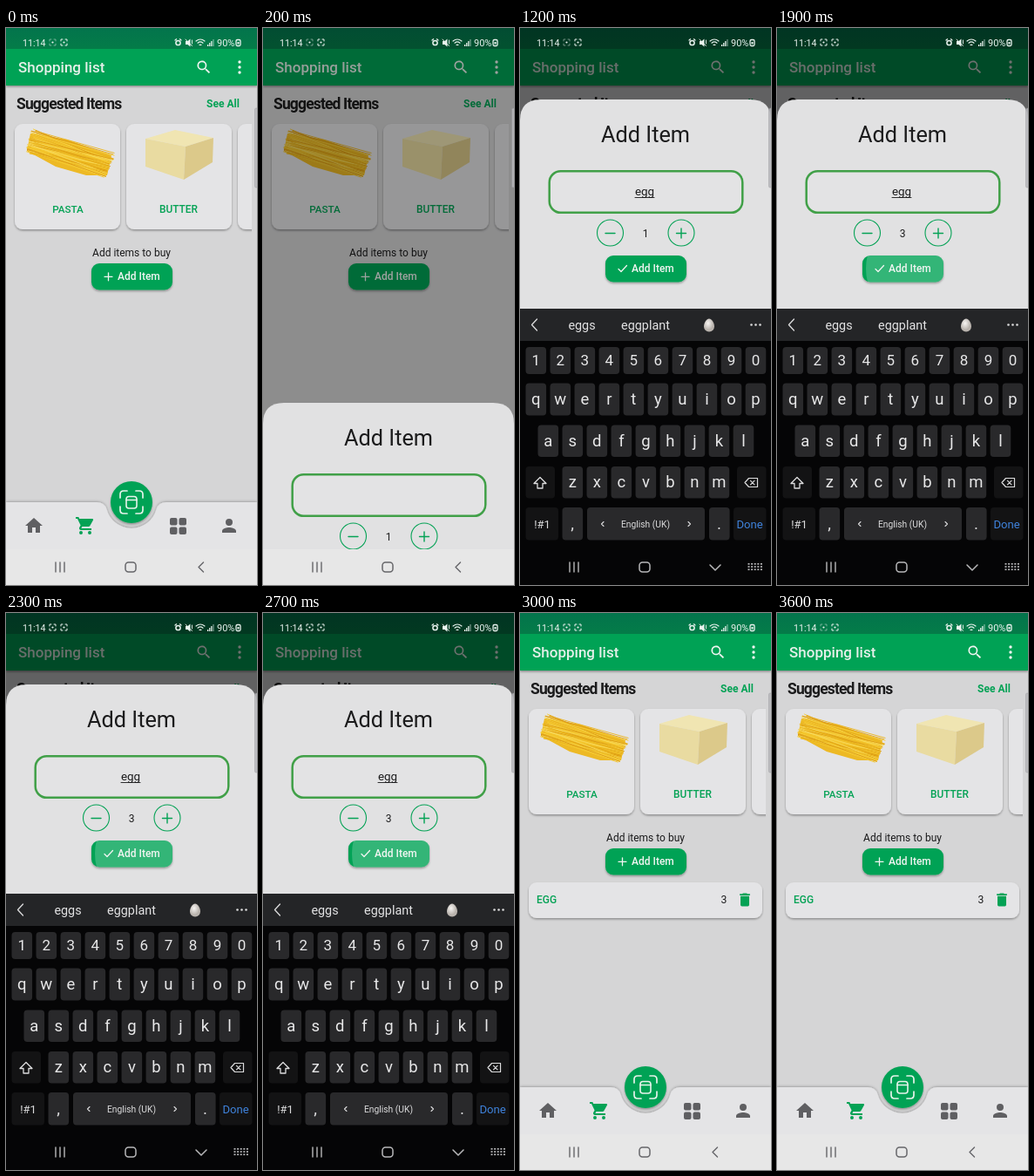
These frames come from a looping animation (288x639 px, 3.7 s). An HTML page:

```html
<!DOCTYPE html>
<html lang="en">
<head>
<meta charset="utf-8">
<title>Shopping list</title>
<style>
html, body { margin: 0; width: 100%; height: 100%; overflow: hidden; background: #d5d5d6; }
svg { display: block; width: 100vw; height: 100vh; }
text { font-family: Roboto, "Liberation Sans", sans-serif; }
.line { fill: none; stroke-linecap: round; stroke-linejoin: round; }
</style>
</head>
<body>
<svg id="stage" viewBox="0 0 288 639" xmlns="http://www.w3.org/2000/svg"></svg>
<script>
const GREEN = '#04a255', INK = '#1b1b1c', GREY = '#5f5f62', LIGHT = '#e4e4e6';
const LOOP = 3700, STEP = 100;

const rect = (x, y, w, h, fill, r = 0, extra = '') =>
  `<rect x="${x}" y="${y}" width="${w}" height="${h}" rx="${r}" fill="${fill}" ${extra}/>`;
const circle = (x, y, r, fill, extra = '') =>
  `<circle cx="${x}" cy="${y}" r="${r}" fill="${fill}" ${extra}/>`;
const shape = (d, fill, extra = '') => `<path d="${d}" fill="${fill}" ${extra}/>`;
const line = (d, color, w = 1.3) => `<path class="line" d="${d}" stroke="${color}" stroke-width="${w}"/>`;
const text = (str, x, y, size, fill, weight = 400, anchor = 'middle', extra = '') =>
  `<text x="${x}" y="${y}" font-size="${size}" fill="${fill}" font-weight="${weight}" text-anchor="${anchor}" ${extra}>${str}</text>`;
const group = (id, body, extra = '') => `<g id="${id}" ${extra}>${body}</g>`;
// 24-unit icon centred on x, y
const icon = (d, x, y, size, fill) =>
  shape(d, fill, `transform="translate(${x - size / 2} ${y - size / 2}) scale(${size / 24})"`);

const ICONS = {
  home: 'M10 20v-6h4v6h5v-8h3L12 3 2 12h3v8z',
  cart: 'M7 18a2 2 0 1 0 0 4 2 2 0 0 0 0-4zM1 2v2h2l3.6 7.6-1.4 2.4c-.7 1.4.3 3 1.8 3h12v-2H7.4l1-2h7.2c.8 0 1.4-.4 1.8-1l3.6-6.5A1 1 0 0 0 20 4H5.2l-.9-2zM17 18a2 2 0 1 0 0 4 2 2 0 0 0 0-4z',
  person: 'M12 12a4 4 0 1 0 0-8 4 4 0 0 0 0 8zm0 2c-2.7 0-8 1.3-8 4v2h16v-2c0-2.7-5.3-4-8-4z',
  search: 'M15.5 14h-.8l-.3-.3A6.5 6.5 0 1 0 13.7 14.4l.3.3v.8l5 5 1.5-1.5zM9.5 14a4.5 4.5 0 1 1 0-9 4.5 4.5 0 0 1 0 9z',
  bin: 'M6 19a2 2 0 0 0 2 2h8a2 2 0 0 0 2-2V7H6zM19 4h-3.5l-1-1h-5l-1 1H5v2h14z',
};

let seed = 7;
const random = () => (seed = (seed * 16807) % 2147483647) / 2147483647;

function pasta() {
  const tones = ['#f6cf3a', '#eab41c', '#f3c52a', '#dc9a12', '#f8da5c'];
  let out = shape('M28 121 70 128 121 146 116 169 92 169 57 159 24 141Z', '#edb925');
  for (let i = 0; i < 64; i++) {
    const a = random(), b = random() * 0.45 + a * 0.55;
    const x1 = 29 - 7 * a + 8 * random(), y1 = 116 + 28 * a;
    const x2 = 124 - 14 * b + 3 * random(), y2 = 142 + 32 * b;
    out += line(`M${x1} ${y1}L${x2} ${y2}`, tones[i % 5], 0.9);
  }
  return out;
}

const butter = () =>
  shape('M160 127 194 117 238 126 206 136Z', '#f0e5b2') +
  shape('M160 127 206 136 204 174 160 159Z', '#e9dba1') +
  shape('M206 136 238 126 237 154 204 174Z', '#dcc98a');

const card = (x, y, w, h) => rect(x, y, w, h, LIGHT, 9, 'filter="url(#shadow)"');

const addButton = (y, mark, id) =>
  rect(98, y, 93, 30.5, GREEN, 9, 'filter="url(#shadow)"') +
  group(id, '') + mark +
  text('Add Item', 128, y + 19.2, 12, '#f1f5f2', 500, 'start');

function home() {
  const dots = [39, 45, 51].map(y => circle(268, y, 1.7, '#f0f5f2')).join('');
  const tiles = [188, 198.5].map(x => [562, 572.5].map(y => rect(x, y, 8.5, 8.5, GREY, 2)).join('')).join('');
  const corners = 'M131 539v-4q0-4 4-4h4M149 531h4q4 0 4 4v4M157 549v4q0 4-4 4h-4M139 557h-4q-4 0-4-4v-4';
  return rect(0, 0, 288, 639, '#d5d5d6') +
    rect(0, 23, 288, 43, GREEN, 0, 'filter="url(#shadow)"') +
    rect(0, 0, 288, 24, 'url(#status)') +
    text('Shopping list', 14, 51, 17, '#e6f0ea', 500, 'start') +
    icon(ICONS.search, 227, 45, 20, '#f0f5f2') + dots +
    text('Suggested Items', 12, 93, 17.5, INK, 700, 'start', 'letter-spacing="-.85"') +
    text('See All', 249, 90.5, 12, GREEN, 700) +
    `<g clip-path="url(#strip)">${card(10, 110, 121, 121)}${card(138, 110, 121, 121)}${card(266, 110, 121, 121)}</g>` +
    pasta() + butter() +
    text('PASTA', 71, 212, 11.7, GREEN, 500) + text('BUTTER', 198, 212, 11.9, GREEN, 500) +
    text('Add items to buy', 144, 262, 12, INK) +
    addButton(270, line('M113 285.3h9M117.5 280.8v9', '#f1f5f2'), 'tap') +
    group('item', card(10, 309, 268, 41) + text('EGG', 19, 333, 12, GREEN, 500, 'start') +
      text('3', 234, 333, 12.2, INK) + icon(ICONS.bin, 258, 329, 20, GREEN)) +
    shape('M0 544H104Q113 544 115.5 552A29.5 29.5 0 0 0 172.5 552Q175 544 184 544H288V639H0Z', LIGHT, 'filter="url(#rim)"') +
    circle(144, 544, 24, GREEN, 'filter="url(#shadow)"') +
    line(corners, '#e8f3ec', 1.7) +
    `<rect x="138" y="537.5" width="12" height="13.5" rx="3" class="line" stroke="#e8f3ec" stroke-width="1.6"/>` +
    line('M138 541.5h12', '#e8f3ec', 1.6) +
    icon(ICONS.home, 32, 571, 24, GREY) + icon(ICONS.cart, 91, 571, 24, GREEN) +
    tiles + icon(ICONS.person, 256, 571, 24, GREY);
}

// Drawn with its top edge at y = 82
function sheet() {
  const ring = x => circle(x, 235, 15, 'none', `stroke="${GREEN}" stroke-width="1.1"`);
  return shape('M0 639V106Q0 82 24 82H264Q288 82 288 106V1200H0Z', '#e1e1e2') +
    text('Add Item', 144, 131, 25.3, INK) +
    rect(33.7, 164.2, 221.6, 47.6, '#e3e3e4', 13, 'stroke="#41a048" stroke-width="2.5"') +
    text('', 143, 191.5, 13.4, INK, 400, 'middle', 'id="entry"') +
    group('underline', line('M132 194.5h22', INK, 0.9)) +
    group('cursor', rect(142.3, 180, 1.4, 13.5, GREEN)) +
    ring(103.5) + ring(185) +
    circle(185, 235, 14.5, GREEN, 'id="plus" opacity=".18"') +
    line('M98 235.5h11M179.500 235.5h11M185 230v11', GREEN, 1.4) +
    text('1', 144, 239.500, 12, INK, 400, 'middle', 'id="count"') +
    addButton(261, line('M113 276.5l3 3 6.500-7', '#f1f5f2'), 'ripple');
}

function keyboard() {
  const key = (x, y, w, h, fill = '#29292b', id = '') => rect(x, y, w, h, fill, 4, id && `id="${id}"`);
  const row = (chars, x, y, h, size) => [...chars].map((c, i) =>
    key(x + 28.02 * i, y, 23.6, h, '#29292b', 'key-' + c) +
    text(c, x + 11.8 + 28.02 * i, y + h / 2 + size * 0.33, size, '#e8e8e9')).join('');
  const ink = '#dcdcdd', dark = '#131314';
  const tools = [32, 95, 158.5, 222].map(x => circle(x, 340, 13.5, '#454547')).join('') +
    `<circle cx="32" cy="340" r="6.2" class="line" stroke="${ink}" stroke-width="1.3"/>` +
    circle(29.7, 338.3, 0.9, ink) + circle(34.3, 338.3, 0.9, ink) + line('M29 341.500q3 4 6 0', ink, 1.1) +
    `<rect x="92.700" y="333" width="4.600" height="9" rx="2.300" class="line" stroke="${ink}" stroke-width="1.2"/>` +
    line('M90 339.500q0 5 5 5t5-5M95 344.500v2.500', ink, 1.2) +
    line('M158.500 333.500 164 336.800V343.200L158.500 346.500 153 343.200V336.800Z', ink, 1.3) +
    `<circle cx="158.500" cy="340" r="2" class="line" stroke="${ink}" stroke-width="1.2"/>` +
    icon(ICONS.search, 222, 340, 17, ink);
  const words = line('M19.500 334l-6 6.500 6 6.500', ink, 1.3) +
    [71, 144, 217].map((x, i) => text('', x, 346, 14.4, '#e3e3e4', 400, 'middle', `id="word${i}"`)).join('') +
    group('egg', shape('M217 333.500C220.500 333.500 223 339 223 342.500A6 6 0 0 1 211 342.500C211 339 213.500 333.500 217 333.500Z', 'url(#shell)'));
  return rect(0, 322, 288, 317, '#050506') + rect(0, 322, 288, 37, '#242527') +
    group('tools', tools) + group('words', words) +
    [265.500, 270.500, 275.500].map(x => circle(x, 340.500, 1.300, ink)).join('') +
    row('1234567890', 6.500, 366, 31, 17) + row('qwertyuiop', 6.500, 407.500, 37, 18.500) +
    row('asdfghjkl', 20.500, 455.500, 36.500, 18.500) + row('zxcvbnm', 48.500, 503, 36.500, 18.500) +
    key(6.500, 503, 33.500, 36.500, dark) + line('M23 515.500l-7 7h4v5.500h6v-5.500h4Z', ink) +
    key(249, 503, 33.500, 36.500, dark) +
    line('M258 521.500l4.500-5h10v10h-10ZM264.500 519.300l4.500 4.500M269 519.300l-4.500 4.500', ink, 1.2) +
    key(6.500, 550, 37.500, 37.500, dark) + text('!#1', 25.500, 573.500, 13, ink) +
    key(48.500, 550, 23.600, 37.500) + text(',', 60, 575, 19, ink) +
    key(77, 550, 135, 37.500) + text('English (UK)', 144, 573, 10.3, ink) +
    line('M96 566.500l-2.500 2.500 2.500 2.500M193 566.500l2.500 2.500-2.500 2.500', ink, 1.1) +
    key(217, 550, 23.600, 37.500) + text('.', 228.500, 575, 19, ink) +
    key(245, 550, 37.500, 37.500, dark) + text('Done', 263.500, 573.500, 13.1, '#3f83dc');
}

function navBar(bg, ink, open) {
  const boards = [0, 1, 2].map(r => [0, 1, 2, 3, 4].map(c => rect(261.500 + c * 3.600, 614 + r * 3.200, 2, 1.700, ink)).join('')).join('');
  return rect(0, 598, 288, 41, bg) +
    line('M57 613v11M62 613v11M67 613v11', ink, 1.4) +
    `<rect x="137" y="613" width="12" height="11" rx="3.500" class="line" stroke="${ink}" stroke-width="1.5"/>` +
    (open ? line('M218 616l6 6 6-6', ink, 1.5) + boards : line('M226.500 613l-5.500 5.500 5.500 5.500', ink, 1.4));
}

function statusBar() {
  const ink = '#eaf2ee';
  const frame = (x, id) => group(id, line(`M${x} 15v-2h2M${x + 5} 13h2v2M${x + 7} 18v2h-2M${x + 2} 20h-2v-2`, ink, 1)) +
    circle(x + 3.5, 16.5, 1.1, ink);
  return text('11:14', 19, 20.500, 10.700, ink, 400, 'start') + frame(50, 'blink') + frame(63, 'steady') +
    `<circle cx="197.500" cy="17" r="2.600" class="line" stroke="${ink}" stroke-width="1.500"/>` +
    line('M194 14l1.500-1.300M201 14l-1.500-1.300', ink, 1.2) +
    shape('M206 15h2.500l3-2.500v9l-3-2.500H206Z', ink) + line('M206 13l7.500 7.500M213.500 14v4', ink, 0.9) +
    line('M218 15q5-4 10 0M220 17.200q3-2.500 6 0M222 19.300h2', ink, 1.2) +
    [0, 1, 2, 3].map(i => rect(231 + i * 2.100, 19 - i * 2, 1.300, 2 + i * 2, ink, 0, i > 2 ? 'opacity=".5"' : '')).join('') +
    text('90%', 242, 20.500, 11, ink, 400, 'start') +
    `<rect x="264" y="13.500" width="5" height="7" rx="1.500" class="line" stroke="${ink}" stroke-width="1.300"/>` +
    rect(265.500, 16, 2, 2.500, ink);
}

const defs = `<defs>
  <filter id="shadow" x="-20%" y="-20%" width="140%" height="150%"><feDropShadow dx="0" dy="1.500" stdDeviation="1.300" flood-color="#000" flood-opacity=".34"/></filter>
  <filter id="rim" x="-5%" y="-10%" width="110%" height="120%"><feDropShadow dx="0" dy="-.5" stdDeviation="1.600" flood-color="#000" flood-opacity=".32"/></filter>
  <linearGradient id="status" x2="0" y2="1"><stop stop-color="#03744c"/><stop offset="1" stop-color="#047c48"/></linearGradient>
  <radialGradient id="shell" cx=".4" cy=".35"><stop stop-color="#f7f5f2"/><stop offset="1" stop-color="#b9b3ad"/></radialGradient>
  <clipPath id="strip"><rect y="100" width="282" height="140"/></clipPath>
  <clipPath id="pill"><rect x="98" y="261" width="93" height="30.500" rx="9"/></clipPath>
</defs>`;

const stage = document.getElementById('stage');
stage.innerHTML = defs + home() + rect(0, 0, 288, 639, '#000', 0, 'id="scrim"') +
  group('sheet', sheet()) + group('keys', keyboard()) +
  group('navLight', navBar('#e7e7e7', '#66666a', false)) +
  group('navDark', navBar('#050506', '#b8b8ba', true)) + statusBar() +
  rect(285.500, 92, 4, 91, '#b9b9bd', 1.500, 'stroke="#98989c" stroke-width=".6" opacity=".85"');

const $ = id => document.getElementById(id);
const show = (id, on) => { $(id).style.display = on ? '' : 'none'; };
$('tap').innerHTML = rect(98, 270, 93, 30.500, '#fff', 9, 'opacity=".2"');
$('ripple').innerHTML = `<g clip-path="url(#pill)">${circle(165, 276, 0, '#fff', 'id="wave" opacity=".2"')}</g>`;

// Each row changes some values from its time on
const steps = [
  [0, { top: 639, scrim: 0, lift: 0, entry: '', words: [], count: 1, key: '', wave: 0 }],
  [100, { tap: true }],
  [200, { tap: false, top: 430, scrim: 0.34 }],
  [300, { top: 192, scrim: 0.54, lift: 0.6, cursor: true }],
  [400, { top: 82, lift: 1 }],
  [700, { key: 'e' }],
  [800, { key: '', entry: 'e', words: ['even', 'every', 'each'], cursor: false }],
  [900, { key: 'g' }],
  [1000, { key: '', entry: 'eg', words: ['egg', 'eggs', 'ego'] }],
  [1100, { key: 'g', entry: 'egg', words: ['eggs', 'eggplant', ''] }],
  [1200, { key: '' }],
  [1400, { plus: true }],
  [1500, { count: 2 }],
  [1600, { plus: false }],
  [1700, { plus: true, count: 3 }],
  [1800, { plus: false, wave: 28 }],
  [1900, { wave: 63 }],
  [2800, { lift: 0, top: 164, scrim: 0.21, wave: 100, closing: true }],
  [2900, { top: 430, scrim: 0.08, item: true }],
  [3000, { top: 639, scrim: 0 }],
];

function draw(t) {
  const s = Object.assign({}, ...steps.filter(row => row[0] <= t).map(row => row[1]));
  const open = s.lift > 0, typed = s.entry !== '';
  show('tap', s.tap);
  show('item', s.item);
  $('scrim').setAttribute('opacity', s.scrim);
  show('sheet', s.top < 639);
  $('sheet').setAttribute('transform', `translate(0 ${s.top - 82})`);
  show('keys', open);
  $('keys').setAttribute('transform', `translate(0 ${276 * (1 - s.lift)})`);
  show('navDark', open);
  show('navLight', !open);
  $('entry').textContent = s.entry;
  show('underline', typed && !s.closing);
  $('underline').setAttribute('transform', `translate(143 0) scale(${s.entry.length / 3} 1) translate(-143 0)`);
  show('cursor', s.cursor);
  $('count').textContent = s.count;
  show('plus', s.plus);
  $('wave').setAttribute('r', s.wave);
  show('tools', !typed);
  show('words', typed);
  show('egg', s.entry === 'egg');
  [0, 1, 2].forEach(i => { $('word' + i).textContent = s.words[i] || ''; });
  for (const c of 'eg') $('key-' + c).setAttribute('fill', s.key === c ? '#5a5a5d' : '#29292b');
  $('blink').setAttribute('opacity', t >= 1900 && t < 3200 ? 1 : 0.45);
}

const start = performance.now();
function tick() {
  const t = (performance.now() - start) % LOOP;
  draw(Math.floor(t / STEP) * STEP);
  requestAnimationFrame(tick);
}
tick();
</script>
</body>
</html>
```
